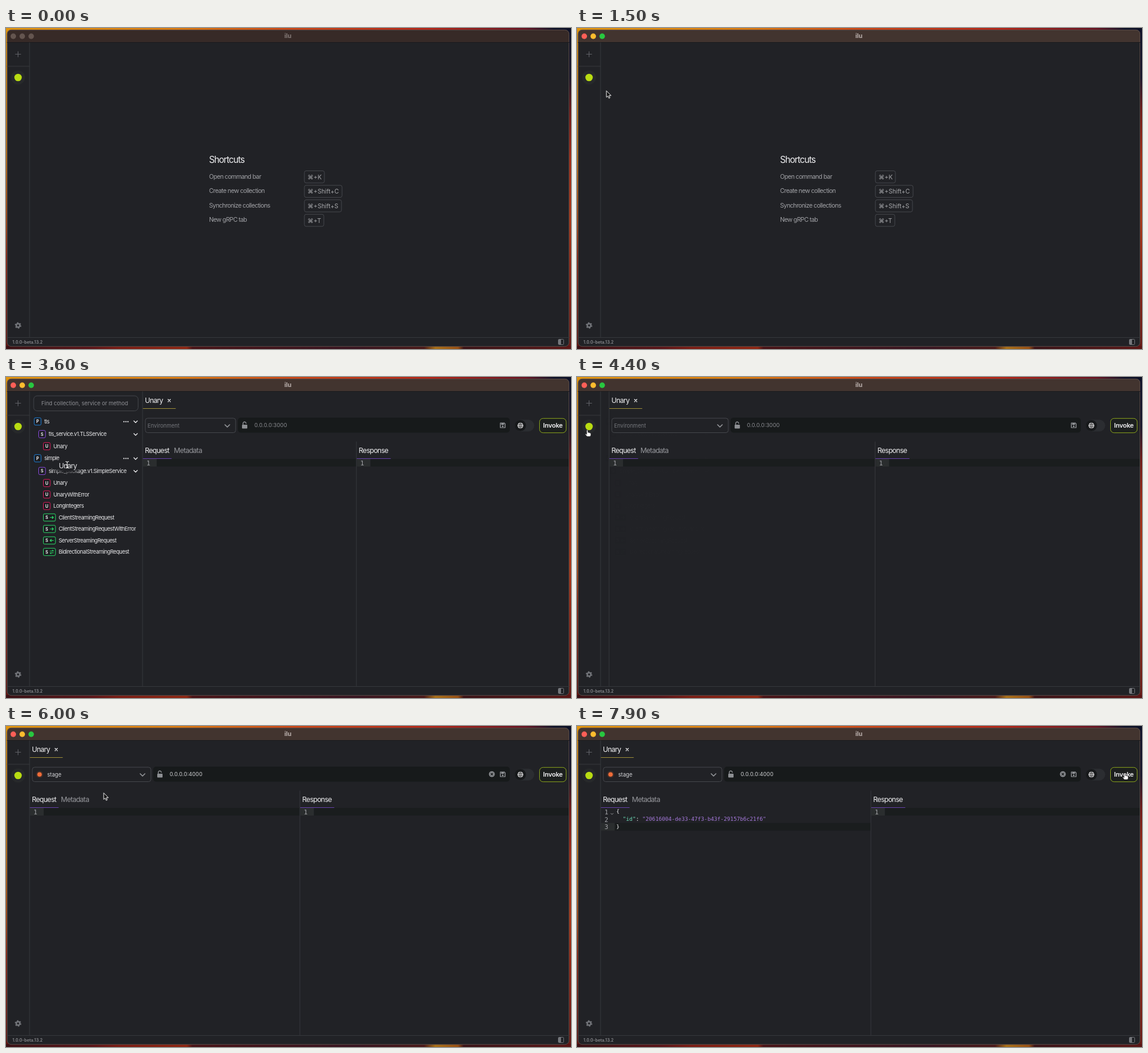
An HTML page that plays this animation: 960 px wide and 545 px high, repeating every 8 s.

```html
<!DOCTYPE html>
<html lang="en">
<head>
<meta charset="utf-8">
<title>Request client</title>
<style>
html, body { margin: 0; width: 100%; height: 100%; overflow: hidden; background: #212226; }
svg { display: block; width: 960px; height: 545px; }
text { font-family: Inter, Roboto, sans-serif; white-space: pre; }
.ui { font-size: 12px; letter-spacing: -.06em; }
.field { font-size: 9.2px; }
.tree { font-size: 9.2px; letter-spacing: -.05em; fill: #e9e9eb; }
.label { font-size: 10.5px; letter-spacing: -.06em; fill: #a0a1a5; }
.key { font-size: 10.3px; fill: #a6a7aa; }
.badge { font-size: 7px; font-weight: 700; fill: #f2f2f4; }
.code { font-family: "DejaVu Sans Mono", "Liberation Mono", monospace; font-size: 9.2px; }
.num { font-family: "DejaVu Sans Mono", "Liberation Mono", monospace; font-size: 10.6px; fill: #a3a4a8; }
</style>
</head>
<body>
<svg id="stage" viewBox="0 0 960 545" xmlns="http://www.w3.org/2000/svg"></svg>
<script>
const LOOP = 8000, STEP = 100, PANEL = 192;
const BG = '#212226', LINE = '#36383c', WHITE = '#f0f0f2', GREY = '#8b8c91', LIME = '#b9dc12';

const rect = (x, y, w, h, fill, rx = 0, stroke = 'none') =>
  `<rect x="${x}" y="${y}" width="${w}" height="${h}" rx="${rx}" fill="${fill}" stroke="${stroke}"/>`;
const circle = (x, y, r, fill, extra = '') => `<circle cx="${x}" cy="${y}" r="${r}" fill="${fill}" ${extra}/>`;
const path = (d, stroke, width = 1, fill = 'none') =>
  `<path d="${d}" stroke="${stroke}" stroke-width="${width}" fill="${fill}" stroke-linejoin="round" stroke-linecap="round"/>`;
const text = (x, y, str, cls, fill = '', extra = '') =>
  `<text x="${x}" y="${y}" class="${cls}" ${fill && `fill="${fill}"`} ${extra}>${str}</text>`;
const group = (x, y, body) => `<g transform="translate(${x} ${y})">${body}</g>`;
const chevron = (x, y, s, color, width = 1.2) => path(`M${x - s} ${y - s / 2}l${s} ${s}l${s} ${-s}`, color, width);
const vline = (x, y1, y2) => path(`M${x} ${y1}V${y2}`, LINE);

// CSS "ease" curve, cubic-bezier(.25, .1, .25, 1)
function ease(p) {
  if (p <= 0) return 0;
  if (p >= 1) return 1;
  const bez = (a, b, u) => 3 * a * u * (1 - u) ** 2 + 3 * b * u * u * (1 - u) + u ** 3;
  let lo = 0, hi = 1;
  for (let i = 0; i < 24; i++) {
    const mid = (lo + hi) / 2;
    if (bez(.25, .25, mid) < p) lo = mid; else hi = mid;
  }
  return bez(.1, 1, lo);
}

// time, x, y, pointer shape
const moves = [
  [100, 520, 470, 'arrow'], [700, 430, 300, 'arrow'], [900, 430, 300, 'arrow'],
  [1500, 50, 107, 'arrow'], [1700, 25, 92, 'hand'], [1800, 18, 90, 'hand'],
  [2000, 19, 92, 'hand'], [2100, 28, 104, 'arrow'], [2600, 101, 179, 'arrow'], [2700, 104, 179, 'arrow'],
  [3100, 104, 179, 'arrow'], [3300, 250, 38, 'arrow'], [3400, 232, 52, 'beam'],
  [3600, 104, 148.5, 'beam'], [3700, 66, 128, 'arrow'], [3900, 20, 96, 'hand'], [4100, 18, 90, 'hand'],
  [4400, 18, 90, 'hand'], [4500, 32, 90, 'arrow'], [4900, 150, 84, 'arrow'], [5100, 161, 83, 'arrow'],
  [5500, 166, 114, 'arrow'], [6100, 166, 114, 'arrow'], [6400, 192, 141, 'beam'],
  [6500, 198, 147, 'beam'], [6900, 198, 147, 'beam'], [7000, 400, 130, 'arrow'],
  [7100, 637, 106, 'arrow'], [7200, 637, 106, 'arrow'], [7700, 905, 86, 'arrow'], [7800, 926, 82, 'hand'],
  [7900, 931, 80, 'hand']
];

function pointerAt(t) {
  if (t < moves[0][0]) return null;
  const i = moves.findLastIndex(m => m[0] <= t);
  const a = moves[i], b = moves[i + 1] || a;
  const p = b === a ? 0 : (t - a[0]) / (b[0] - a[0]);
  return { x: a[1] + (b[1] - a[1]) * p, y: a[2] + (b[2] - a[2]) * p, shape: a[3] };
}

const shapes = {
  arrow: path('M0 0V10.6L2.5 8.4L4.2 12.3L6 11.5L4.3 7.8H7.6Z', '#f4f4f4', 1, '#111'),
  hand: path('M-1.6 1Q-.6-.8.6 1V4.2Q1.6 3.5 2.3 4.6Q3.4 4 4 5.1Q5.4 4.8 5.6 6.2V8.4Q5.4 9.8 4.4 11H-1L-3.8 7.6Q-3.8 5.8-1.6 7.2Z', '#222', .7, '#fff'),
  beam: path('M-2.5-5Q0-5 0-3Q0-5 2.5-5M0-3V4M-2.5 6Q0 6 0 4Q0 6 2.5 6M-1.2 1H1.2', '#e8e8e8', 1.1)
};

const gradient = (id, down, stops) =>
  `<linearGradient id="${id}" x1="0" y1="0" x2="${down ? 0 : 1}" y2="${down ? 1 : 0}">` +
  stops.split(' ').map(s => { const [o, c] = s.split(':'); return `<stop offset="${o}" stop-color="#${c}"/>`; }).join('') +
  '</linearGradient>';

const backdrop = '<defs>' +
  gradient('top', 0, '0:e0940e .3:dc7c10 .5:cc4816 .75:b42416 .92:661220 .97:0c1026') +
  gradient('left', 1, '0:d8900e .4:c47410 .62:a8420e .72:90200c 1:5c1410') +
  gradient('right', 1, '0:0c1026 .15:141228 .25:6c1614 .4:a02a14 .6:a83616 .75:902412 1:661a16') +
  gradient('bottom', 0, '0:3a1014 .15:5a1418 .2:7a1c14 .32:8e2612 .33:481216 .62:381420 .74:4a1818 .76:a87018 .8:985014 .81:3a1216 1:5a1616') +
  '<radialGradient id="fade"><stop offset=".55" stop-color="#212226"/><stop offset="1" stop-color="#212226" stop-opacity="0"/></radialGradient>' +
  '<clipPath id="panel"><rect x="40" y="25" width="180.5" height="500"/></clipPath></defs>' +
  rect(0, 0, 960, 12, 'url(#top)') + rect(0, 533, 960, 12, 'url(#bottom)') +
  rect(0, 4, 12, 536, 'url(#left)') + rect(948, 4, 12, 536, 'url(#right)');

function frame(active) {
  const lights = active ? ['#ff5f57', '#febc2e', '#28c840'] : ['#64554f', '#64554f', '#64554f'];
  return rect(2, 3, 955, 538, BG, 7) +
    `<path d="M2 24V10a7 7 0 0 1 7-7H950a7 7 0 0 1 7 7V24Z" fill="${active ? '#42342f' : '#372a27'}"/>` +
    rect(2, 3.3, 954.6, 537.4, 'none', 7, '#5a4d49') +
    path('M2 24.5H957', '#191a1d') +
    lights.map((c, i) => circle(12.4 + 15.2 * i, 14, 4.7, c)).join('') +
    text(479, 17.4, 'ilu', 'title', active ? '#b9aeab' : '#857a77', 'font-size="10.5" font-weight="700" text-anchor="middle"');
}

const rail =
  vline(40, 25, 525) + path('M2 65H40M2 525.5H957', LINE) +
  path('M16 44.5H25M20.5 40V49', '#606267', 1.1) +
  circle(20.5, 84, 12, '#27292b') + circle(20.5, 84, 6.3, LIME) +
  circle(20.5, 505, 3, 'none', 'stroke="#717378" stroke-width="2.4"') +
  circle(20.5, 505, 4.6, 'none', 'stroke="#717378" stroke-width="1.8" stroke-dasharray="2.4 2.417"') +
  text(11, 535.6, '1.0.0-beta.13.2', 'status', '#8e8f93', 'font-size="7" font-weight="600" letter-spacing=".1"') +
  rect(938.5, 528.5, 9, 9, 'none', 1, '#74767b') + rect(939, 529, 4, 8, '#74767b');

const keys = [['Open command bar', '⌘+K', 34], ['Create new collection', '⌘+Shift+C', 64],
  ['Synchronize collections', '⌘+Shift+S', 63], ['New gRPC tab', '⌘+T', 33]];
const shortcuts = text(345, 228.5, 'Shortcuts', 'heading', WHITE, 'font-size="15.2" letter-spacing="-1"') +
  keys.map(([name, combo, w], i) => {
    const y = 24.6 * i;
    return text(345, 255.6 + y, name, 'label') + rect(507, 242.5 + y, w, 20.5, 'none', 3, '#45474c') +
      text(512.3, 256.8 + y, combo, 'key');
  }).join('');

const BLUE = '#1c7ed6', VIOLET = '#8a4be0', RED = '#e0195a', GREEN = '#2bd968';
const arrows = { out: 'M0 0H5.5M3.5-2L5.5 0L3.5 2', in: 'M5.5 0H0M2-2L0 0L2 2',
  both: 'M0-1.5H5.5L4-3M5.5 1.5H0L1.5 3' };
// y, indent, letter, colour, label, arrow
const rows = [
  [75.5, 48, 'P', BLUE, 'tls'], [97, 55.5, 'S', VIOLET, 'tls_service.v1.TLSService'],
  [117.5, 63.5, 'U', RED, 'Unary'],
  [138, 48, 'P', BLUE, 'simple'], [159.5, 55.5, 'S', VIOLET, 'simple_package.v1.SimpleService'],
  [180, 63.5, 'U', RED, 'Unary'], [199.5, 63.5, 'U', RED, 'UnaryWithError'], [219, 63.5, 'U', RED, 'LongIntegers'],
  [238.5, 63.5, 'S', GREEN, 'ClientStreamingRequest', 'out'],
  [258, 63.5, 'S', GREEN, 'ClientStreamingRequestWithError', 'out'],
  [277.5, 63.5, 'S', GREEN, 'ServerStreamingRequest', 'in'],
  [297, 63.5, 'S', GREEN, 'BidirectionalStreamingRequest', 'both']
];

function treeRow([y, x, letter, color, name, arrow]) {
  const w = arrow ? 20.5 : 11.5;
  let out = rect(x, y - 6.2, w, 12.4, '#1c1d21', 2, color) +
    text(x + 5.7, y + 2.6, letter, 'badge', '', 'text-anchor="middle"') +
    text(x + w + 5.4, y + 3.3, name, 'tree');
  if (arrow) out += group(x + 11.5, y, path(arrows[arrow], GREEN, 1.1));
  if (letter === 'P') out += [0, 1, 2].map(i => circle(200.4 + 3.4 * i, y + .3, 1.1, WHITE)).join('');
  return out;
}

const treeBody = rect(47, 32, 177.5, 25.5, 'none', 6, '#43454a') +
  text(60, 48, 'Find collection, service or method', 'field', '#8f9095') +
  '<g clip-path="url(#panel)">' + rows.map(treeRow).join('') + '</g>' +
  rows.filter(r => r[1] < 60).map(r => chevron(220.2, r[0] + .5, 3, WHITE)).join('');

function tree(w, p) {
  const hot = p && w === PANEL && p.x > 40 && p.x < 232 && p.shape === 'arrow' &&
    rows.find(r => r[1] > 60 && Math.abs(r[0] - p.y) < 9.7);
  return (hot ? rect(40.5, hot[0] - 9.7, 191, 19.4, '#282b2c') : '') +
    `<g opacity="${(w / PANEL) ** 2}">${treeBody}</g>` + vline(40 + w, 25, 525);
}

const lock = rect(-4.5, -1, 9, 6.5, '#8d8f93', 1) + path('M-2.8-1V-3A2.6 2.6 0 0 1 2.4-3.2', '#8d8f93', 1.4);
const disk = path('M-4-4H2.5L4-2.5V4H-4Z', '#a3a5a9', 1.2) + rect(-2.5, -3.4, 4.5, 2.4, '#a3a5a9') + circle(0, 1.6, 1.3, '#a3a5a9');
const globe = circle(0, 0, 4.9, '#e4e4e6') + path('M-4.5-1.6H4.5M-4.5 1.6H4.5M0-4.6V4.6M-1-4.5Q-3.6 0-1 4.5M1-4.5Q3.6 0 1 4.5', '#222', .7);
const clear = circle(0, 0, 5, '#85878b') + path('M-1.7-1.7L1.7 1.7M1.7-1.7L-1.7 1.7', '#16191a', 1.1);
const envDot = (x, y, c) => circle(x, y, 6, c, 'opacity=".15"') + circle(x, y, 3.8, c);

function addressBar(left, w, picked) {
  const sw = 201.5 - w / 4, fx = left + 4.5 + sw + 4;
  return rect(left + 4.7, 70, sw, 24.5, BG, 4, '#45474c') +
    (picked ? envDot(left + 17, 82.3, '#ee6c38') + text(left + 30, 85.6, 'stage', 'field', '#d4d5d8')
            : text(left + 8.5, 85.6, 'Environment', 'field', '#74767b')) +
    chevron(left + sw - 9.5, 83, 4, '#96989c', 1.6) +
    rect(fx, 69, 856 - fx, 25.5, '#171a1b', 5) +
    group(fx + 11.5, 82, lock) +
    text(fx + 28, 85.2, picked ? '0.0.0.0:4000' : '0.0.0.0:3000', 'field', picked ? '#d0d1d4' : GREY) +
    (picked ? group(825.5, 81.7, clear) : '') + group(844, 82, disk) +
    rect(864.5, 72.5, 33, 20, '#2b2d31', 10) + circle(874, 82.5, 9.5, '#17191b') + group(874, 82.5, globe) +
    rect(906.5, 70.3, 45.3, 24.4, '#1c1f1e', 6, '#8aa31c') +
    text(929.2, 86.2, 'Invoke', 'invoke', WHITE, 'font-size="11" font-weight="600" letter-spacing="-.3" text-anchor="middle"');
}

const lineMark = (x, end, y) => rect(x + 1, y, 23, 13, '#2a2d2e') + rect(x + 24, y, end - x - 24, 13, '#1a1d1e');

function page(t, w) {
  const left = 40 + w, mid = 499.3 + w / 2, pasted = t >= 6900;
  let out = text(left + 4, 44, 'Unary', 'ui', WHITE) +
    path(`M${left + 43.3} 38l4 4m0-4l-4 4`, WHITE, 1.2) +
    path(`M${left + 1} 53.5H${left + 56}`, '#9c8c38') +
    addressBar(left, w, t >= 6000) +
    text(left + 4, 128.8, 'Request', 'ui', WHITE) + text(left + 53.3, 128.8, 'Metadata', 'ui', '#96979c') +
    text(mid + 4, 128.8, 'Response', 'ui', WHITE) +
    lineMark(left, mid, pasted ? 164.6 : 139) + lineMark(mid, 956, 139) +
    path(`M${left + 1} 138.5H${left + 49}M${mid + 1} 138.5H${mid + 58}`, '#6640a8') +
    vline(mid, 110, 525) +
    text(left + 6.8, 150, '1', 'num') + text(mid + 6.8, 150, '1', 'num');
  if (pasted) out += text(46.8, 162.6, '2', 'num') + text(46.8, 175.4, '3', 'num') +
    chevron(59.5, 149.3, 1.9, '#a3a4a8', .9) +
    text(66.7, 148.2, '{', 'code', WHITE) + text(77.8, 160.6, '"id"', 'code', '#6fe3bd') +
    text(100, 160.6, ':', 'code', WHITE) +
    text(111, 160.6, '"20616004-de33-47f3-b43f-29157b6c21f6"', 'code', '#a679dc') +
    text(66.7, 173.6, '}', 'code', WHITE);
  if (t >= 6500 && t < 7400) out += pasted ? rect(72.5, 165.5, 1, 11, WHITE) : rect(66.5, 140, 1, 11, WHITE);
  return out;
}

function dropdown(hover) {
  const options = [['stage', '#ee6c38'], ['local', '#35c46a'], ['prod', '#e03a4a']];
  return rect(44.7, 98.5, 201.5, 87, '#25262b', 4, '#43454a') +
    options.map(([name, c], i) => {
      const y = 102 + 26.5 * i;
      return (i === 0 && hover ? rect(48.5, y, 194, 25.5, '#323439', 4) : '') +
        envDot(60, y + 12.8, c) + text(73, y + 16, name, 'field', '#d4d5d8');
    }).join('');
}

const ghost = ({ x, y }) => `<ellipse cx="${x}" cy="${y + 3}" rx="30" ry="15" fill="url(#fade)"/>` +
  text(x - 14.3, y + 6, 'Unary', 'ui', '#e0e0e2');

function scene(t) {
  const p = pointerAt(t);
  const w = PANEL * (ease((t - 1800) / 300) - ease((t - 4200) / 300));
  let out = backdrop + frame(t >= 900) + rail;
  if (w > 0) out += tree(w, p);
  out += t < 3100 ? group(w / 2, 0, shortcuts) : page(t, w);
  if (t >= 5000 && t < 6000) out += dropdown(p.y > 101);
  if (t >= 3400 && t < 3700) out += ghost(p);
  if (p) out += group(p.x, p.y, shapes[p.shape]);
  return out;
}

const stage = document.getElementById('stage');
let shown = -1;
function draw(now) {
  const t = Math.floor(now % LOOP / STEP) * STEP;
  if (t !== shown) stage.innerHTML = scene(shown = t);
  requestAnimationFrame(draw);
}
draw(0);
</script>
</body>
</html>
```
